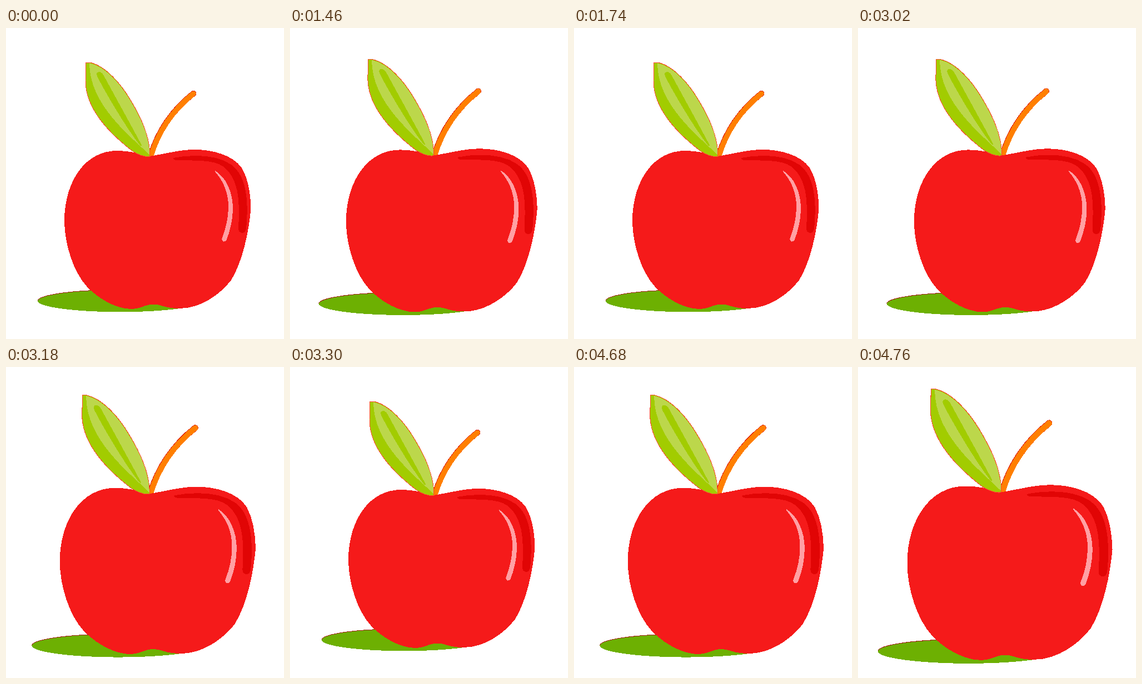
An HTML page for the animation above (4.78 s loop, 500x560 px).

```html
<!DOCTYPE html>
<html lang="en">
<head>
<meta charset="utf-8">
<title>Beating apple</title>
<style>
  html, body { margin: 0; width: 100%; height: 100%; overflow: hidden; background: #fff; }
  svg { display: block; width: 500px; height: 560px; }
</style>
</head>
<body>
<svg viewBox="0 0 500 560" shape-rendering="crispEdges">
  <g id="apple">
    <ellipse cx="205" cy="491.3" rx="148" ry="20" fill="#6db002"/>
    <path d="M57 491A148 20 0 0 1 160 472.4" fill="none" stroke="#a02010"/>
    <g fill="none" stroke-linecap="round">
      <path d="M259.500 232Q280 163 337 118" stroke="#e02000" stroke-width="10.5"/>
      <path d="M260 232Q280.500 163.500 337 118.300" stroke="#ff7f00" stroke-width="9.5"/>
    </g>
    <path fill="#f51a1a" d="M258 231C242 226 222 221 200 221C140 221 105 280 105 347C105 390 122 440 145 465
      C165 487 198 506 226 506C242 506 250 497.500 265 497.500C280 497.500 285 505 312 505
      C350 505 385 480 405 454C426 420 437 365 440.500 325C440 295 434 268 424 252
      C408 229 372 219 340 219C312 219 290 226 258 231Z"/>
    <path fill="#e10505" d="M301 234C335 227 380 228 405 246C432 265 437 310 432 362Q430 369 424 369Q418 368 418 361
      C420 320 420 285 402 261C385 237 360 239 305 238Q300 236 301 234Z"/>
    <path fill="#ffa0a4" d="M376 257C395 268 408 295 408 325C408 345 403 365 397 381Q395 385 391 384.500Q387 382 389 377
      C396 360 400 340 400 322C400 295 390 275 377 260Z"/>
    <path fill="#a2cc00" stroke="#ff4a30" d="M144 62H151C181 69 208 103 223 128C243 161 259 195 259 231
      C250 233 238 228 228 222C194 196 143 150 143 95Z"/>
    <path fill="#bcd74b" d="M150 63C181 70 207.500 104 222.500 129C243 162 258.500 195 258.500 229C226 196 150 140 150 63Z"/>
    <path fill="#a2cc00" d="M164 87Q161 80 167 79Q172 79 176 86C190 112 225 175 244 211Q243 214 240 210C215 178 178 115 164 87Z"/>
  </g>
</svg>
<script>
const LOOP = 4780, STEP = 20, PERIOD = 1560, FIRST_BEAT = 1440;
const CX = 270, CY = 286;
// A double beat, weak then strong: [ms, scale].
const BEAT = [[0, 1], [80, 1.1], [160, 1], [240, 1.2], [300, 1]];
const apple = document.getElementById('apple');

function scaleAt(time) {
  const t = Math.floor(time / STEP) * STEP - FIRST_BEAT;
  const beat = t % PERIOD;
  const next = BEAT.findIndex(([at]) => at > beat);
  if (t < 0 || next < 0) return 1;
  const [t0, s0] = BEAT[next - 1], [t1, s1] = BEAT[next];
  return s0 + (s1 - s0) * (beat - t0) / (t1 - t0);
}

function draw() {
  const s = scaleAt(performance.now() % LOOP);
  apple.setAttribute('transform', `translate(${CX} ${CY}) scale(${s}) translate(${-CX} ${-CY})`);
  requestAnimationFrame(draw);
}
draw();
</script>
</body>
</html>
```
